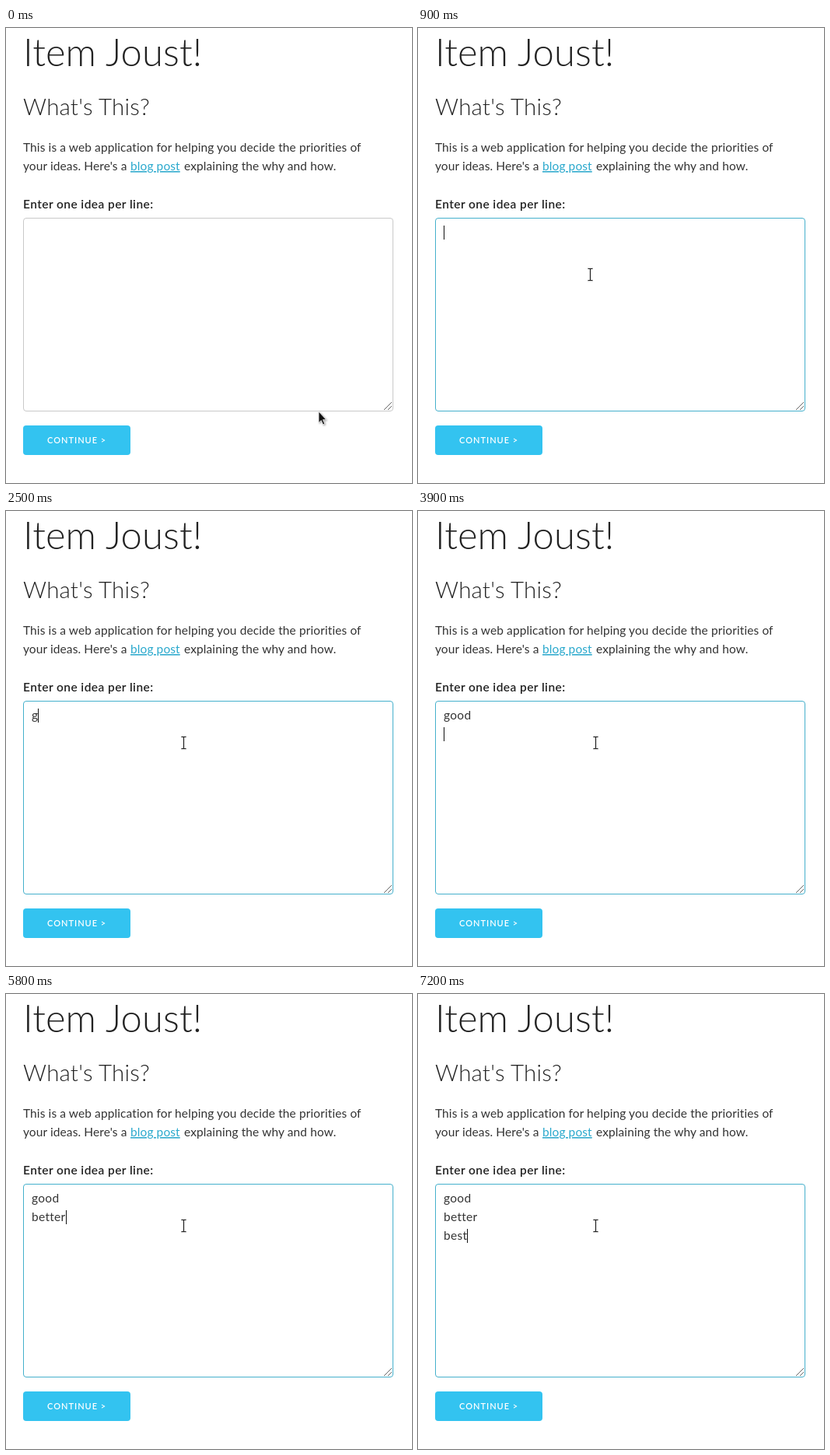
Write an HTML page that moves like this. It is 522 by 585 pixels and loops after 8 s.

```html
<!DOCTYPE html>
<html lang="en">
<head>
<meta charset="utf-8">
<title>Item Joust!</title>
<style>
  html, body { margin: 0; width: 100%; height: 100%; overflow: hidden; background: #fff; }
  svg { display: block; width: 522px; height: 585px; }
  text { font: 400 15.5px Lato, "Open Sans", sans-serif; letter-spacing: .1px; fill: #333; white-space: pre; }
  .title { font-size: 49px; font-weight: 300; letter-spacing: .1px; fill: #222; }
  .heading { font-size: 29.5px; font-weight: 300; letter-spacing: .2px; fill: #222; }
  .label { font-weight: 600; letter-spacing: .43px; fill: #222; }
  .link { fill: #2ba9cd; text-decoration: underline 1px; text-underline-offset: 2px; }
  .button { font-size: 11px; font-weight: 600; letter-spacing: 1px; fill: #fff; }
  #lines text { letter-spacing: .3px; }
</style>
</head>
<body>
<svg viewBox="0 0 522 585">
  <text class="title" x="22" y="49">Item Joust!</text>
  <text class="heading" x="22" y="112">What's This?</text>
  <text x="22" y="159">This is a web application for helping you decide the priorities of</text>
  <text x="22" y="183">your ideas. Here's a</text>
  <text class="link" x="160" y="183">blog post</text>
  <text x="229" y="183">explaining the why and how.</text>
  <text class="label" x="22" y="232">Enter one idea per line:</text>

  <rect id="field" x="22.5" y="244.5" width="475" height="248" rx="3.5" fill="#fff"/>
  <path d="M486 491L496 481M491 491L496 486" stroke="#666" fill="none"/>
  <g id="lines"></g>
  <path id="caret" d="M.5 -14V4" stroke="#111"/>

  <rect x="22" y="511" width="138" height="38" rx="4" fill="#33c3f0"/>
  <text class="button" x="53" y="534">CONTINUE &gt;</text>

  <path id="arrow" d="M0 0V14.5L3.3 11.6L5.6 17L7.8 16L5.5 10.7H9.8Z"
        fill="#111" stroke="#fff" stroke-width=".8" style="filter:drop-shadow(1px 1px 1px #0006)"/>
  <g id="beam" fill="none">
    <path d="M-3 -8H4M.5 -8V8M-3 8H4" stroke="#ddd" stroke-width="2.5"/>
    <path d="M-2.5 -7.5H3.5M.5 -7.5V7.5M-2.5 7.5H3.5" stroke="#222"/>
  </g>
</svg>
<script>
const LOOP = 8000, STEP = 100, FOCUS = 700;
const LEFT = 33, BASELINE = 268, LEADING = 24;

// [time, text] after each keystroke
const typing = [
  [0, ""], [2500, "g"], [2900, "go"], [3100, "goo"], [3300, "good"], [3900, "good\n"],
  [4500, "good\nb"], [4600, "good\nbe"], [4800, "good\nbet"],
  [5300, "good\nbett"], [5500, "good\nbette"], [5700, "good\nbetter"], [5900, "good\nbetter\n"],
  [6500, "good\nbetter\nb"], [6700, "good\nbetter\nbe"],
  [6900, "good\nbetter\nbes"], [7100, "good\nbetter\nbest"]
];
const caretOff = [[1300, 1600], [3700, 3900], [4300, 4500], [5100, 5300], [6200, 6500]];
// [time, x, y]
const pointerPath = [[0, 402, 493], [500, 221, 317], [1400, 221, 317], [1600, 228, 298]];

const $ = id => document.getElementById(id);
const show = (node, on) => node.setAttribute("visibility", on ? "visible" : "hidden");
const move = (node, x, y) => node.setAttribute("transform", `translate(${x} ${y})`);
const ease = p => p * p * (3 - 2 * p);

const rows = [0, 1, 2].map(i => {
  const row = document.createElementNS("http://www.w3.org/2000/svg", "text");
  row.setAttribute("x", LEFT);
  row.setAttribute("y", BASELINE + i * LEADING);
  return $("lines").appendChild(row);
});

function pointerAt(t) {
  const next = pointerPath.findIndex(point => point[0] > t);
  if (next < 0) return pointerPath.at(-1).slice(1);
  const [t0, x0, y0] = pointerPath[next - 1];
  const [t1, x1, y1] = pointerPath[next];
  const p = ease((t - t0) / (t1 - t0));
  return [Math.round(x0 + (x1 - x0) * p), Math.round(y0 + (y1 - y0) * p)];
}

function render(time) {
  const t = Math.floor((time % LOOP) / STEP) * STEP;
  const focused = t >= FOCUS;
  $("field").setAttribute("stroke", focused ? "#45b0cc" : "#c9c9c9");

  const lines = typing.findLast(key => key[0] <= t)[1].split("\n");
  rows.forEach((row, i) => row.textContent = lines[i] || "");

  const last = lines.length - 1;
  const width = lines[last] ? rows[last].getComputedTextLength() : 0;
  move($("caret"), Math.round(LEFT + width), BASELINE + last * LEADING);
  show($("caret"), focused && !caretOff.some(([from, to]) => t >= from && t < to));

  const [x, y] = pointerAt(t);
  const overField = y < 492;
  move($("arrow"), x, y);
  move($("beam"), x, y);
  show($("arrow"), !overField);
  show($("beam"), overField);
}

const start = performance.now();
function frame() {
  render(performance.now() - start);
  requestAnimationFrame(frame);
}
frame();
</script>
</body>
</html>
```
